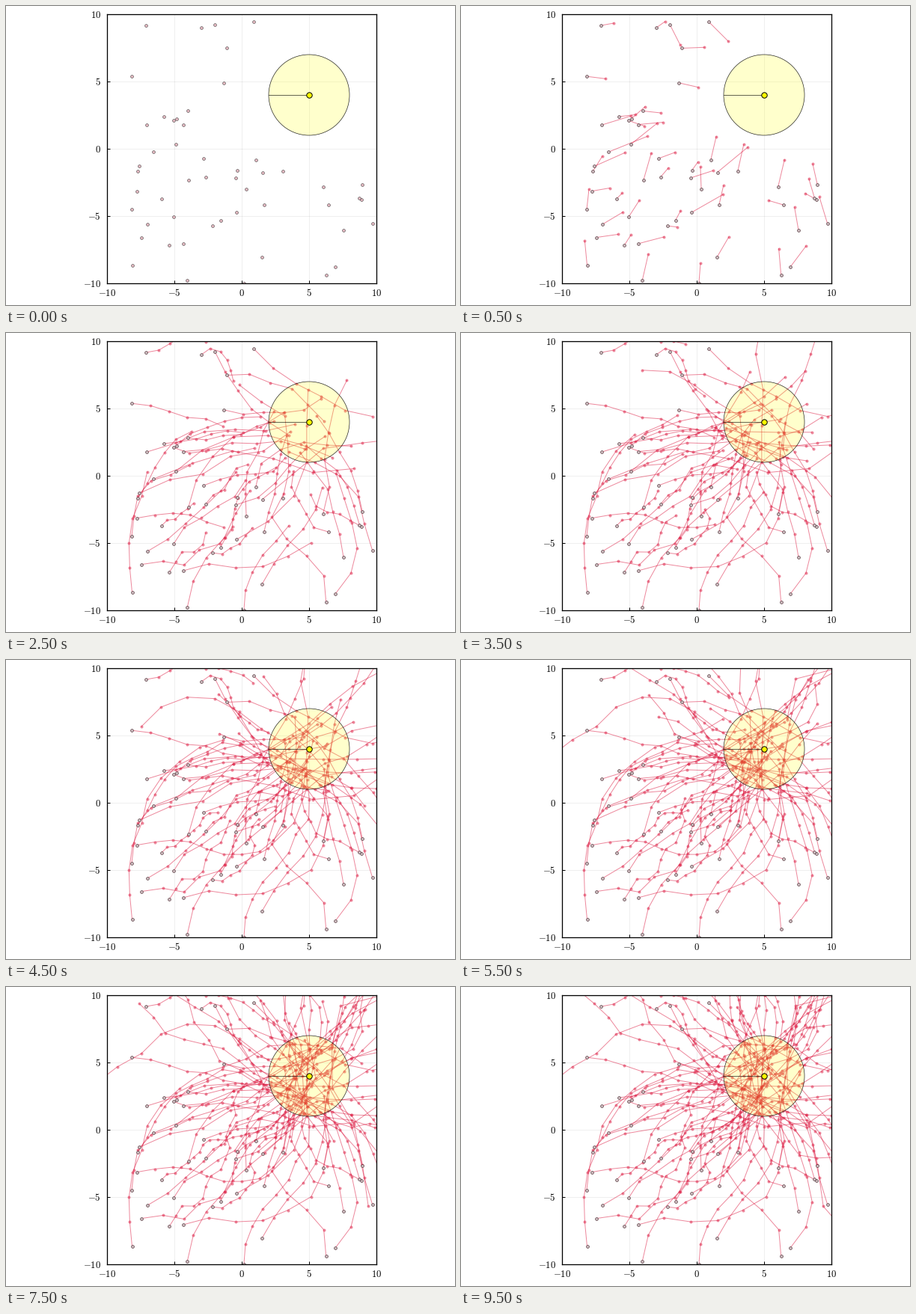
A matplotlib script that plays this animation: 600x400 px, repeating every 10 s.

```python
import numpy as np
import matplotlib.pyplot as plt
from matplotlib.animation import FuncAnimation
from matplotlib.patches import Circle

W, H, DPI = 600, 400, 100
STEPS, INTERVAL = 20, 500
PX = 72 / DPI
WALKERS = 51
GOAL, RADIUS = np.array([5.0, 4.0]), 3
CRIMSON = "#dc143c"

plt.rcParams["mathtext.fontset"] = "cm"


def bearing(pos):
    dx, dy = (GOAL - pos).T
    return np.arctan2(dy, dx)


def distance(pos):
    return np.hypot(*(GOAL - pos).T)


def walk(seed=8):
    """Walkers steer loosely to the disc; once they reach it they wander."""
    rng = np.random.RandomState(seed)
    spots = rng.uniform((-8.3, -10), (10, 9.5), (8 * WALKERS, 2))
    pos = spots[distance(spots) > 2 * RADIUS][:WALKERS]
    speed = np.clip(rng.normal(1.55, 0.6, WALKERS), 0.6, 3.1)
    heading = bearing(pos) + rng.normal(0, 0.5, WALKERS)
    arrived = np.zeros(WALKERS, bool)
    points = [pos]
    for _ in range(1, STEPS):
        step = np.column_stack([np.cos(heading), np.sin(heading)])
        pos = pos + speed[:, None] * step
        points.append(pos)
        arrived |= distance(pos) < RADIUS
        off = np.angle(np.exp(1j * (bearing(pos) - heading)))
        steer = np.where(arrived, 0, np.clip(0.35 * off, -0.6, 0.6))
        heading = heading + steer + rng.normal(0, 0.3, WALKERS)
    return np.array(points)


PATHS = walk()

fig = plt.figure(figsize=(W / DPI, H / DPI), dpi=DPI, facecolor="white")
ax = fig.add_axes([135 / W, 1 - 371 / H, 360 / W, 360 / H])
ax.set(xlim=(-10, 10), ylim=(-10, 10))
ticks = range(-10, 11, 5)
labels = [f"${t}$" for t in ticks]
ax.set_xticks(ticks, labels, va="baseline")
ax.set_yticks(ticks, labels)
ax.tick_params(direction="in", length=4 * PX, width=PX, labelsize=12.7 * PX)
ax.tick_params(axis="x", pad=16.5 * PX)
ax.tick_params(axis="y", pad=8 * PX)
ax.grid(color="black", alpha=0.1, lw=0.6 * PX)
ax.set_axisbelow(True)
for spine in ax.spines.values():
    spine.set_linewidth(1.3 * PX)
    spine.set_zorder(9)

trails = [
    ax.plot([], [], "-o", color=CRIMSON, alpha=0.5, lw=PX, ms=4 * PX,
            mew=0, zorder=2)[0]
    for _ in range(WALKERS)
]
starts, = ax.plot(*PATHS[0].T, "o", ms=3.8 * PX, mew=0.8 * PX,
                  mec=(0, 0, 0, 0.55), zorder=3)

thin = dict(color=(0, 0, 0, 0.8), lw=0.75 * PX, zorder=5)
ax.add_patch(Circle(GOAL, RADIUS, fc=(1, 1, 0, 0.2), ec="none", zorder=4))
ax.add_patch(Circle(GOAL, RADIUS, fill=False, ec=thin["color"],
                    lw=thin["lw"], zorder=5))
ax.plot([GOAL[0] - RADIUS, GOAL[0]], [GOAL[1]] * 2, **thin)
ax.plot(*GOAL, "o", color="yellow", mec="black", ms=7.4 * PX, mew=PX, zorder=6)


def draw(step):
    for i, trail in enumerate(trails):
        path = PATHS[:step + 1, i] if step else np.empty((0, 2))
        trail.set_data(*path.T)
    starts.set_markerfacecolor("#ecc0c8" if step == 0 else "#d3c0c4")
    return [*trails, starts]


anim = FuncAnimation(fig, draw, frames=STEPS, interval=INTERVAL,
                     init_func=lambda: draw(0), repeat=True, repeat_delay=0)
plt.show()
```
